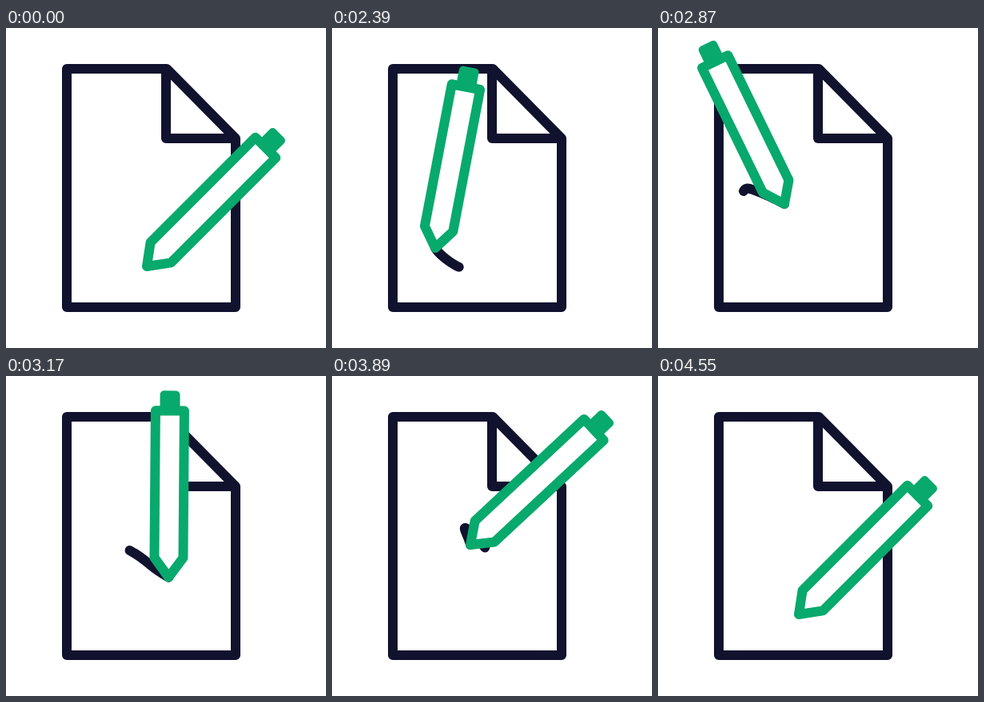
These frames come from a looping animation (400x400 px, 4.58 s). An HTML page:

```html
<!DOCTYPE html>
<html lang="en">
<head>
<meta charset="utf-8">
<title>Signing a document</title>
<style>
  html, body { margin: 0; width: 100%; height: 100%; overflow: hidden; background: #fff; }
  svg { display: block; width: 100%; height: 100%; }
  path { fill: none; stroke: #10122e; stroke-width: 12; stroke-linecap: round; stroke-linejoin: round; }
  #body { fill: #fff; stroke: #08a96c; }
  #cap { fill: #08a96c; }
</style>
</head>
<body>
<svg viewBox="0 0 400 400">
  <path d="M76 51H201L287 138V349H76ZM200 51V138H287"/>
  <path id="trail"/>
  <g id="pen">
    <rect id="cap" x="-12.5" width="25" height="30" rx="5"/>
    <path id="body"/>
  </g>
</svg>
<script>
const LOOP = 4580, START = 2000, STEP = 30;

// time, tip x, tip y, tilt in degrees, pen length
const POSES = [
  [2000, 176, 298, 45, 210],
  [2120, 180, 299, 40, 210],
  [2210, 174, 301, 31, 209],
  [2300, 155, 297, 20, 208],
  [2390, 129, 275, 10.8, 205],
  [2540, 106, 221, -8.5, 187],
  [2640, 107, 204, -15, 179],
  [2700, 115, 201, -19, 179],
  [2870, 158, 220, -26, 198],
  [3080, 191, 244, -8, 206],
  [3260, 213, 256, 9, 210],
  [3330, 212, 249, 15, 211],
  [3500, 198, 224, 30, 212],
  [3620, 184, 206, 35, 211],
  [3780, 166, 190, 43, 211],
  [3890, 173, 211, 47, 211],
  [4160, 186, 277, 48.7, 210],
  [4550, 176, 298, 45, 210]
];

// time, moment at which the visible ink begins
const INK = [
  [2200, 2200], [2390, 2285], [2540, 2400], [2870, 2640], [3080, 2785],
  [3500, 3105], [3890, 3560], [4160, 3785], [4520, 4520]
];

const el = id => document.getElementById(id);
const trail = el('trail'), pen = el('pen'), body = el('body'), cap = el('cap');

function segment(keys, t) {
  let i = 0;
  while (i < keys.length - 2 && t >= keys[i + 1][0]) i++;
  return i;
}

function slope(i, k) {
  const a = POSES[i - 1], b = POSES[i + 1];
  return a && b ? (b[k] - a[k]) / (b[0] - a[0]) : 0;
}

// Smooth pose at time t: [x, y, tilt, length]
function poseAt(t) {
  t = Math.min(Math.max(t, START), POSES[POSES.length - 1][0]);
  const i = segment(POSES, t), a = POSES[i], b = POSES[i + 1];
  const span = b[0] - a[0], u = (t - a[0]) / span, v = 1 - u;
  return [1, 2, 3, 4].map(k =>
    v * v * (1 + 2 * u) * a[k] + u * u * (3 - 2 * u) * b[k] +
    span * u * v * (v * slope(i, k) - u * slope(i + 1, k)));
}

function inkStart(t) {
  if (t <= INK[0][0] || t >= INK[INK.length - 1][0]) return t;
  const i = segment(INK, t), [t0, s0] = INK[i], [t1, s1] = INK[i + 1];
  return s0 + (s1 - s0) * (t - t0) / (t1 - t0);
}

function trailPath(from, to) {
  if (to - from < 1) return '';
  const n = 40, points = [];
  for (let i = 0; i <= n; i++) {
    const [x, y] = poseAt(from + (to - from) * i / n);
    points.push(x.toFixed(2) + ' ' + y.toFixed(2));
  }
  return 'M' + points.join('L');
}

function draw(time) {
  const raw = time % LOOP;
  const t = raw < START + STEP ? START : START + STEP * Math.floor((raw - START) / STEP);
  const [x, y, tilt, len] = poseAt(t);
  trail.setAttribute('d', trailPath(inkStart(t), t));
  pen.setAttribute('transform', `translate(${x} ${y}) rotate(${tilt})`);
  body.setAttribute('d', `M0 0L-18 -24.5V${-len}H18V-24.5Z`);
  cap.setAttribute('y', -len - 25);
}

const origin = performance.now();
function tick() {
  draw(performance.now() - origin);
  requestAnimationFrame(tick);
}
tick();
</script>
</body>
</html>
```
